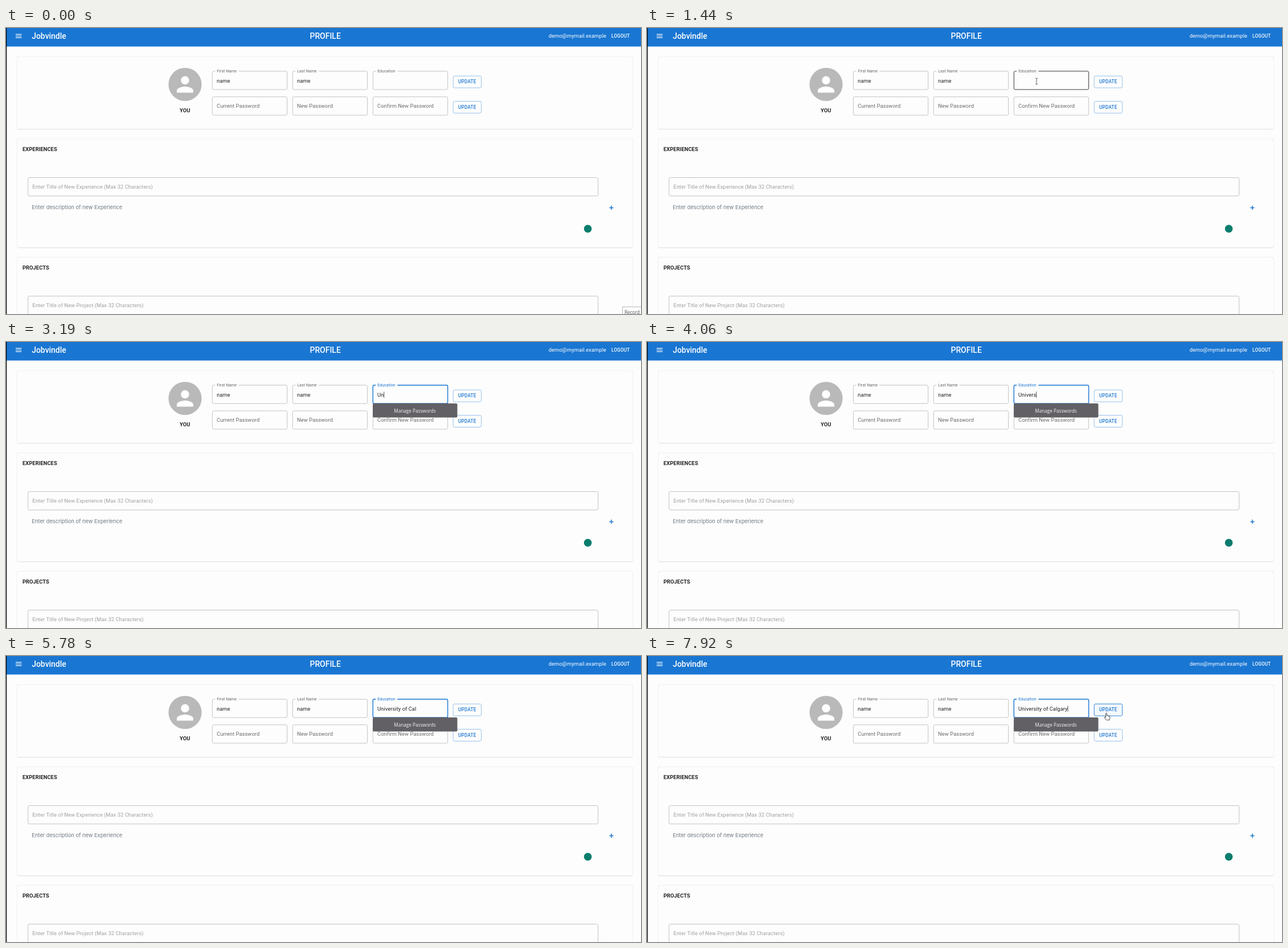
Write an HTML page that moves like this. It is 1115 px wide and 502 px high and loops after 7990 ms.

```html
<!DOCTYPE html>
<html lang="en">
<head>
<meta charset="utf-8">
<title>Profile</title>
<style>
html, body { margin: 0; width: 100%; height: 100%; overflow: hidden; background: #fdfdfd; }
svg { display: block; }
text { font: 9.29px Roboto, sans-serif; letter-spacing: .00938em; fill: #212121; white-space: pre; }
.bar text { fill: #fff; }
text.title { font-size: 13.94px; font-weight: 500; letter-spacing: 0; }
text.button { font-size: 8.13px; font-weight: 500; letter-spacing: .02857em; }
.heading { font-weight: 700; }
text.label { font-size: 6.97px; fill: #666; }
text.hint { fill: #6a6a6a; }
text.faint { fill: #a0a0a0; }
text.note { font-family: Inter, sans-serif; letter-spacing: 0; fill: #6f7983; }
text.system { font: 8.2px "Open Sans", sans-serif; letter-spacing: 0; }
.card { fill: #fdfdfd; filter: drop-shadow(0 .8px .5px rgba(0,0,0,.32)) drop-shadow(0 .3px .8px rgba(0,0,0,.12)); }
.field { fill: none; stroke: #bdbdbd; stroke-width: .9; }
.field.hover { stroke: #212121; }
.field.focus { stroke: #1976d2; stroke-width: 1.4; }
.update rect { fill: #fdfdfd; stroke: #8cbae8; stroke-width: .9; }
.update text { fill: #1976d2; }
.update.hover rect { fill: #f4f8fc; stroke: #1976d2; }
</style>
</head>
<body>
<svg id="stage" width="1115" height="502" viewBox="0 0 1115 502"></svg>
<script>
const stage = document.getElementById('stage');
const $ = id => document.getElementById(id);

const text = (x, y, words, kind = '', more = '') =>
  `<text x="${x}" y="${y}" class="${kind}" ${more}>${words}</text>`;
const box = (x, y, w, h, kind, id = '') =>
  `<rect x="${x}" y="${y}" width="${w}" height="${h}" rx="2.3" class="${kind}" id="${id}"/>`;
const card = (y, h) => box(20, y, 1080, h, 'card');
const labelled = (x, label, width, value, id) =>
  box(x, 75.8, 131.3, 32.2, 'field', id) +
  `<path d="M${x + 5} 75.8h${width + 6}" stroke="#fdfdfd" stroke-width="3"/>` +
  text(x + 8, 78, label, 'label', `id="${id}Label"`) +
  text(x + 7.7, 95.8, value, '', `id="${id}Value"`);
const password = (x, label, id) =>
  box(x, 120.8, 131.3, 32.2, 'field', id) + text(x + 7.8, 139.9, label, 'hint');
const update = (y, id) =>
  `<g class="update" id="${id}">${box(785.2, y, 49.4, 20.8, '')}${text(794, y + 13.2, 'UPDATE', 'button')}</g>`;
const section = (y, heading, noun, id) =>
  card(y, 190.4) + text(29, y + 21, heading, 'heading') +
  box(38.7, y + 67.6, 1001, 32.2, 'field', id) +
  text(46.3, y + 87, `Enter Title of New ${noun} (Max 32 Characters)`, 'faint');

stage.innerHTML = `
  <rect width="1115" height="502" fill="#fdfdfd"/>
  ${card(51, 126.6)}
  <circle cx="314.4" cy="99" r="29.1" fill="#b9b9b9"/>
  <path transform="translate(292.6 77.3) scale(1.815)" fill="#fff"
    d="M12 12a4 4 0 1 0 0-8a4 4 0 0 0 0 8zm0 2c-2.7 0-8 1.3-8 4v2h16v-2c0-2.7-5.3-4-8-4z"/>
  ${text(314.3, 148, 'YOU', 'heading', 'text-anchor="middle"')}
  ${labelled(362.3, 'First Name', 35, 'name', 'first')}
  ${labelled(503.3, 'Last Name', 35, 'name', 'last')}
  ${labelled(644.3, 'Education', 32, '', 'education')}
  ${password(362.3, 'Current Password', 'current')}
  ${password(503.3, 'New Password', 'fresh')}
  ${password(644.3, 'Confirm New Password', 'confirm')}
  ${update(84.2, 'saveInfo')}
  ${update(128.6, 'savePassword')}
  <path id="caret" d="M0 87.3v10.4" stroke="#222" stroke-width=".8"/>
  ${section(195, 'EXPERIENCES', 'Experience', 'experience')}
  ${text(45.2, 318, 'Enter description of new Experience', 'note')}
  <path d="M1059.4 315.4h7.2M1063 311.8v7.2" stroke="#1976d2" stroke-width="1.5"/>
  <circle cx="1021.6" cy="352.4" r="6.8" fill="#0b7d6e"/>
  ${section(403, 'PROJECTS', 'Project', 'project')}
  <g class="bar">
    <rect width="1115" height="32.5" fill="#1976d2"/>
    <path d="M16.9 11.1h10.5m-10.5 2.9h10.5m-10.5 2.9h10.5" stroke="#fff" stroke-width="1.15"/>
    ${text(45.2, 19.3, 'Jobvindle', 'title')}
    ${text(533.5, 19.3, 'PROFILE', 'title')}
    ${text(1054, 17.4, 'demo@mymail.example', '', 'text-anchor="end"')}
    ${text(1063, 17, 'LOGOUT', 'button')}
  </g>
  <rect width="1.2" height="502" fill="#000"/>
  <g id="popup">
    <rect x="644" y="107.7" width="148.5" height="24.8" rx="2" fill="#626065"/>
    ${text(718, 124, 'Manage Passwords', 'system', 'text-anchor="middle" style="fill:#f2f2f2"')}
  </g>
  <g id="tooltip">
    <rect x="1082.5" y="489.5" width="40" height="20" fill="#fdfdfd" stroke="#b5b5b5"/>
    ${text(1086, 502.3, 'Record', 'system', 'style="fill:#575757"')}
  </g>
  <g id="arrow"><path d="M.4 .4V9.4L2.5 7.5L4 10.8L5.5 10.1L4.1 7H6.8Z" fill="#fff" stroke="#222" stroke-width=".8"/></g>
  <g id="beam"><path d="M-2-5.2h1.5l.5.5l.5-.5h1.5M0-4.7v9.4M-2 5.2h1.5l.5-.5l.5.5h1.5" fill="none" stroke="#333" stroke-width=".8"/></g>
  <g id="hand"><path d="M-1 1Q0-.6 1 1V5L5.8 6.2Q6.8 6.6 6.5 8L5.6 12.7H-.2L-3.4 8.5Q-3.4 7-2 7.4L-1 8.3Z"
    fill="#fff" stroke="#222" stroke-width=".8"/></g>`;

const loop = 7990;
const school = 'University of Calgary';
const typedAt = [2900, 3120, 3390, 3460, 3590, 3720, 4060, 4120, 4260, 4390,
  4590, 4730, 4790, 4920, 5250, 5380, 5580, 6310, 6440, 6510, 6690];

// Pointer stops: time, x, y; the pointer jumps between them.
const stops = [
  [640, 995, 452], [700, 894, 374], [770, 844, 300], [840, 824, 237], [900, 822, 222],
  [970, 819, 212], [1040, 816, 205], [1100, 797, 182], [1170, 784, 159], [1240, 742, 126],
  [1300, 706, 104], [1370, 687, 94.5], [1440, 684, 93.5], [2900],
  [7430, 871, 53], [7500, 866, 60], [7570, 860, 66], [7640, 850, 74],
  [7710, 838, 82], [7780, 824, 90], [7850, 812, 96], [7920, 806.5, 99.6]];

const inside = (x, y, id) => {
  const b = $(id).getBBox();
  return x > b.x && x < b.x + b.width && y > b.y && y < b.y + b.height;
};
const show = (id, opacity) => $(id).setAttribute('opacity', +opacity);
const between = (t, from, to) => t >= from && t < to;

function draw(t) {
  const [, x, y] = stops.filter(s => s[0] <= t).pop() || [];
  const present = x !== undefined;
  const focused = t >= 2040;

  let overField = false;
  for (const id of ['education', 'confirm', 'experience', 'project']) {
    const over = present && inside(x, y, id);
    overField ||= over;
    $(id).classList.toggle('hover', over || id === 'experience' && between(t, 770, 900));
  }
  $('education').classList.toggle('focus', focused);
  $('educationLabel').style.fill = focused ? '#1976d2' : '';

  const overButton = present && inside(x, y, 'saveInfo');
  $('saveInfo').classList.toggle('hover', overButton);
  const shape = !present ? '' : overButton ? 'hand' : overField ? 'beam' : 'arrow';
  for (const id of ['arrow', 'beam', 'hand']) {
    show(id, id === shape);
    if (id === shape) $(id).setAttribute('transform', `translate(${x} ${y})`);
  }

  const value = $('educationValue');
  value.textContent = school.slice(0, typedAt.filter(at => at <= t).length);
  const caretX = 652.4 + (value.textContent ? value.getComputedTextLength() : 0);
  $('caret').setAttribute('transform', `translate(${caretX})`);
  show('caret', focused && !between(t, 2570, 2900) && !between(t, 5780, 6310) && !between(t, 6840, 7430));

  show('popup', t < 2110 ? 0 : t < 2180 ? .6 : 1);
  show('tooltip', t < 70 ? 1 : t < 120 ? .5 : 0);
}

const start = performance.now();
function tick() {
  draw((performance.now() - start) % loop);
  requestAnimationFrame(tick);
}
tick();
</script>
</body>
</html>
```
